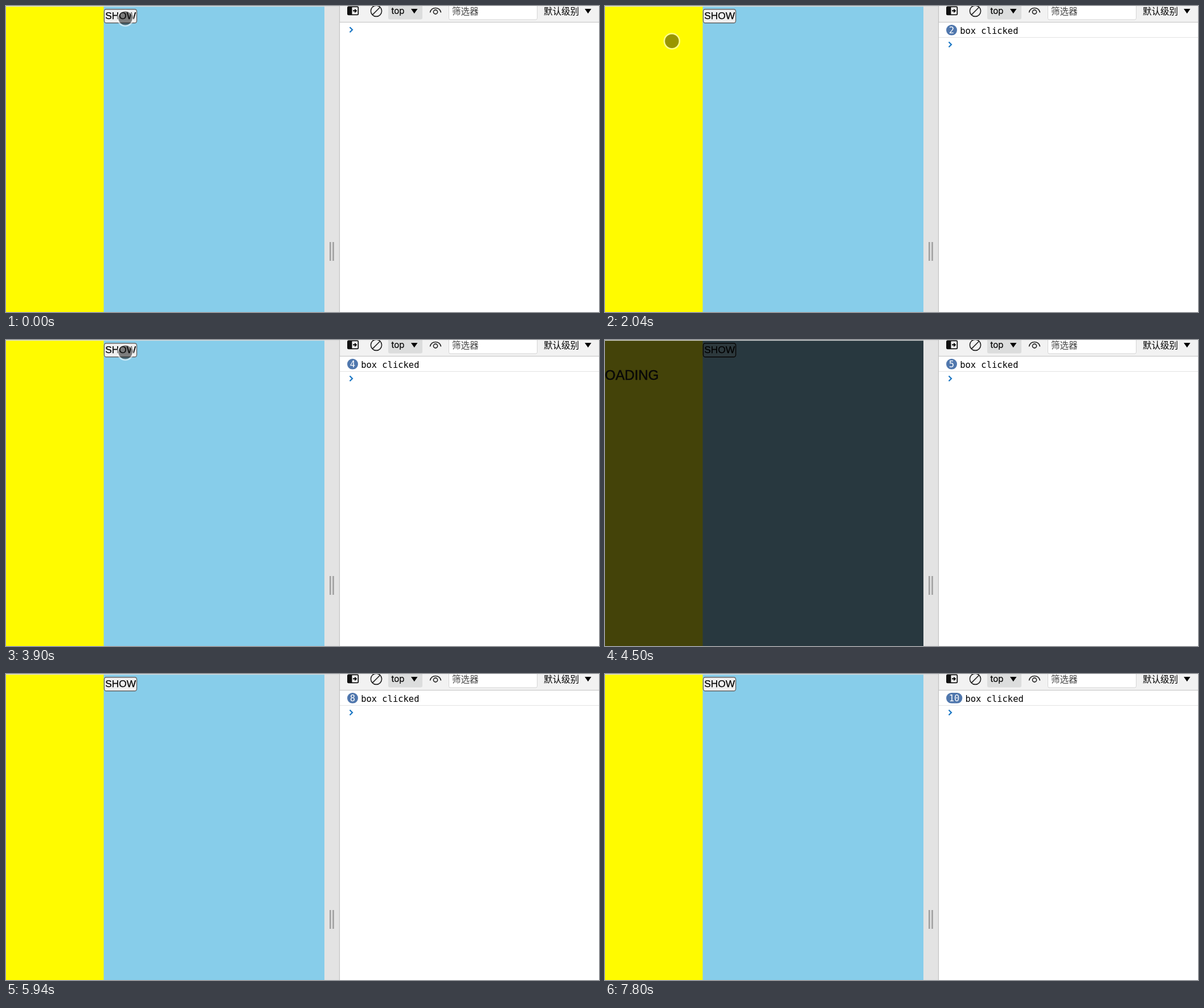
An HTML page that plays this animation: 1041x538 px, repeating every 7920 ms.

```html
<!DOCTYPE html>
<html lang="zh">
<head>
<meta charset="utf-8">
<title>Overlay click demo</title>
<style>
  html, body { margin: 0; width: 100%; height: 100%; overflow: hidden; background: #fff; }
  svg { display: block; width: 1041px; height: 538px; }
  text { white-space: pre; }
  .page { font-family: "Liberation Sans", Arial, sans-serif; }
  .show { font-size: 17.3px; stroke: #000; stroke-width: .25; }
  .ui { font: 15px Inter, Roboto, sans-serif; stroke: #000; stroke-width: .2; }
  .cjk { font: 15.5px "Noto Sans CJK SC", "Noto Sans CJK", sans-serif; }
  .mono { font: 15.45px "DejaVu Sans Mono", monospace; }
  .line { fill: none; stroke: #222; stroke-width: 1.6; }
  .button { stroke-width: 1.4; }
  #ring { fill: none; stroke: #fff; stroke-opacity: .55; stroke-width: 2.6; }
</style>
</head>
<body>
<svg viewBox="0 0 1041 538">
  <g class="page">
    <rect width="172" height="538" fill="#fffb00"/>
    <rect x="171.5" width="387.5" height="538" fill="#87cdea"/>
    <rect class="button" x="172.5" y="5.7" width="57" height="24" rx="3.5" fill="#efefef" stroke="#666"/>
    <text class="show" x="174.2" y="23.2">SHOW</text>
    <g id="overlay">
      <rect width="559" height="538" fill="#0c0c0c" fill-opacity=".77"/>
      <g id="idle">
        <rect class="button" x="172.5" y="5.7" width="57" height="24" rx="3.5" fill="#2d393d" stroke="#080808"/>
        <text class="show" x="174.2" y="23.2">SHOW</text>
      </g>
      <text x="-13.6" y="70" font-size="24" fill="#080808" stroke="#080808" stroke-width=".5">LOADING</text>
    </g>
    <rect width="585" height="1.2" fill="#dcdcdc"/>
  </g>

  <g id="cursor">
    <circle id="dot" r="12.4"/>
    <circle id="ring" r="13.4"/>
  </g>

  <rect x="559" y="1" width="26" height="537" fill="#e3e3e3"/>
  <path d="M569.3 415v33M574.5 415v33" stroke="#a0a0a0" stroke-width="2.6"/>

  <rect x="585" width="456" height="538" fill="#fff"/>
  <rect x="585" width="456" height="28" fill="#f2f2f2"/>
  <path d="M585 28.5h456M585.5 0v538" stroke="#c2c2c2" stroke-width="1.2"/>

  <rect x="599.9" y="1.4" width="18.4" height="14" rx="1.5" fill="#fff" stroke="#111" stroke-width="1.8"/>
  <path d="M600 1h7.500v15H600zM609 7.300h3V4.400l4.500 4-4.500 4V9.500H609z" fill="#111"/>
  <circle class="line" cx="650" cy="8.8" r="9.6"/>
  <path class="line" d="M643.2 15.6l13.6-13.6"/>
  <path d="M671 0h60v20.500q0 3-3 3h-54q-3 0-3-3z" fill="#dcdddd"/>
  <text class="ui" x="676.5" y="14">top</text>
  <path id="arrow" d="M711 5h11.5l-5.75 8.2z"/>
  <use href="#arrow" x="305"/>
  <path class="line" d="M744.5 11.5C746 .8 762 .8 763.5 11.5"/>
  <circle class="line" cx="754" cy="10.5" r="3.6"/>
  <path d="M777.5 -1v22.5q0 2.5 2.5 2.5h150q2.5 0 2.5-2.5V-1z" fill="#fff" stroke="#d4d4d4"/>
  <text class="cjk" x="783" y="15" fill="#444">筛选器</text>
  <text class="cjk" x="944" y="14.5">默认级别</text>

  <g id="row">
    <rect id="badge" x="599" y="33" height="18.6" rx="9.3" fill="#5077ad"/>
    <text id="count" class="mono" y="48" fill="#fff" text-anchor="middle" font-weight="bold"></text>
    <text id="message" class="mono" y="48.7">box clicked</text>
    <path d="M586 55.3h455" stroke="#e6e6e6" stroke-width="1.2"/>
  </g>
  <path id="prompt" d="M603.5 37.3l4.5 4.5-4.5 4.5" fill="none" stroke="#1a76c4" stroke-width="2.2"/>
</svg>
<script>
  const LOOP = 7920, STEP = 60, EXIT = 840;
  const HOVER = [209.5, 21.5], AWAY = [-18, 84];
  // Alternate clicks open and close the overlay; every click logs once.
  const clicks = [840, 1740, 2460, 3300, 4020, 4740, 5240, 5940, 6480, 6960];

  const $ = id => document.getElementById(id);
  const toggle = (id, on) => $(id).setAttribute("display", on ? "inline" : "none");
  const clamp = k => Math.min(1, Math.max(0, k));
  const mix = (a, b, k) => a + (b - a) * k;
  const between = (a, b, kx, ky = kx) => [mix(a[0], b[0], kx), mix(a[1], b[1], ky)];

  function pointerAt(t, count) {
    if (!count) {
      const nudge = 2 * clamp((t - 180) / 120);
      return HOVER.map(v => v - nudge);
    }
    const since = t - clicks[count - 1];
    if (count === clicks.length) {
      const k = since / EXIT;
      return between(AWAY, [133, 543], Math.sin(k * Math.PI / 2), clamp(k * 1.4));
    }
    const gap = clicks[count] - clicks[count - 1];
    if (count % 2) return between(HOVER, AWAY, clamp(since / gap / .55) ** 1.5);
    const k = clamp(since / gap / .7);
    return between(AWAY, HOVER, k, k * k);
  }

  function draw(now) {
    const t = Math.floor((now % LOOP) / STEP) * STEP;
    const count = clicks.filter(c => c <= t).length;
    const [x, y] = pointerAt(t, count);
    const overButton = x > 165 && y < 40;
    const extra = count > 9 ? 9.3 : 0;

    toggle("overlay", count % 2);
    toggle("idle", !overButton);
    toggle("cursor", t < clicks.at(-1) + EXIT);
    $("cursor").setAttribute("transform", `translate(${x} ${y})`);
    $("dot").setAttribute("fill", overButton ? "rgba(20,20,20,.52)" : "rgba(0,0,0,.4)");

    toggle("row", count);
    $("badge").setAttribute("width", 19 + extra);
    $("count").setAttribute("x", 608.4 + extra / 2);
    $("count").textContent = count;
    $("message").setAttribute("x", 623.2 + extra);
    $("prompt").setAttribute("transform", `translate(0 ${count ? 26 : 0})`);
  }

  const start = performance.now();
  function tick() {
    draw(performance.now() - start);
    requestAnimationFrame(tick);
  }
  tick();
</script>
</body>
</html>
```
